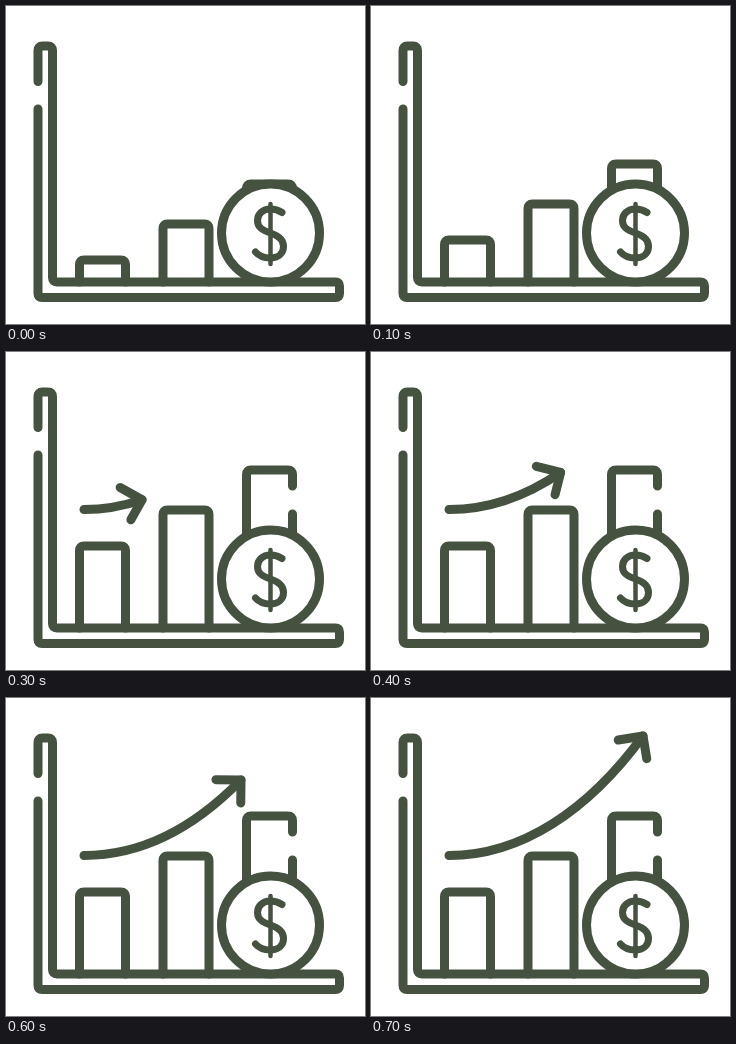
Animation of 359 by 318 pixels, one loop 2800 ms. Source, as an HTML page:

```html
<!DOCTYPE html>
<html lang="en">
<head>
<meta charset="utf-8">
<title>Growth chart</title>
<style>
  html, body { margin: 0; width: 100%; height: 100%; overflow: hidden; background: #fff; }
  svg { display: block; width: 359px; height: 318px; }
  .ink { fill: none; stroke: #44523f; stroke-width: 9; stroke-linecap: round; stroke-linejoin: round; }
</style>
</head>
<body>
<svg viewBox="0 0 359 318" class="ink">
  <path d="M32 75.5V44.5q0-4.500 4.500-4.500h5.500q4.500 0 4.500 4.500V271.500q0 4.500 4.500 4.500H329.500q4 0 4 4v7.500q0 4-4 4H36q-4 0-4-4V103"/>
  <path id="bars"/>
  <circle cx="264.500" cy="227" r="49" fill="#fff"/>
  <path stroke-width="7" style="stroke-width:7" d="M276 206.500C273 204.500 269 203 264.500 203C256.500 203 251.500 208 251.500 214.500C251.500 222 257.500 224.500 264.500 227C272 229.500 277.500 233 277.500 240.500C277.500 247.500 272 252 264 252C258 252 253 250 249.500 246"/>
  <path style="stroke-width:4.500" d="M264.500 198V258"/>
  <g id="arrow">
    <path id="curve" d="M78 157.500C150 157.500 217 113 272 38"/>
    <path id="head" d="M-18 -17.500L0 0L-16 16.500"/>
  </g>
</svg>
<script>
  const LOOP = 2800, STEP = 100;
  const [bars, arrow, curve, head] =
    ["bars", "arrow", "curve", "head"].map(id => document.getElementById(id));
  const length = curve.getTotalLength();

  // Fraction of the curve drawn and heading in degrees, from the fourth step on
  const arrowPoses = [[0.25, -15], [0.505, -30], [0.63, -37], [0.757, -43.5], [1, -53.5]];

  const barTop = (x, top, leftEnd) =>
    `M${x} ${leftEnd}V${top + 4.5}q0-4.500 4.500-4.500h37q4.500 0 4.500 4.500`;

  function draw(step) {
    const drop = 20 * Math.max(0, 3 - step);
    const top = 118 + drop;
    bars.setAttribute("d",
      barTop(73.5, 194 + drop, 276) + "V276" +
      barTop(157, 158 + drop, 276) + "V276" +
      barTop(240.5, top, 195) + `V${top + 16}` +
      `M286.500 ${Math.max(162, top + 4.5)}V195`);

    const pose = arrowPoses[step - 3];
    arrow.style.display = pose ? "" : "none";
    if (!pose) return;
    const drawn = pose[0] * length;
    const tip = curve.getPointAtLength(drawn);
    curve.setAttribute("stroke-dasharray", `${drawn} ${length * 2}`);
    head.setAttribute("transform", `translate(${tip.x} ${tip.y}) rotate(${pose[1]})`);
  }

  const start = performance.now();
  function frame() {
    const time = (performance.now() - start) % LOOP;
    draw(Math.min(7, Math.floor(time / STEP)));
    requestAnimationFrame(frame);
  }
  frame();
</script>
</body>
</html>
```
